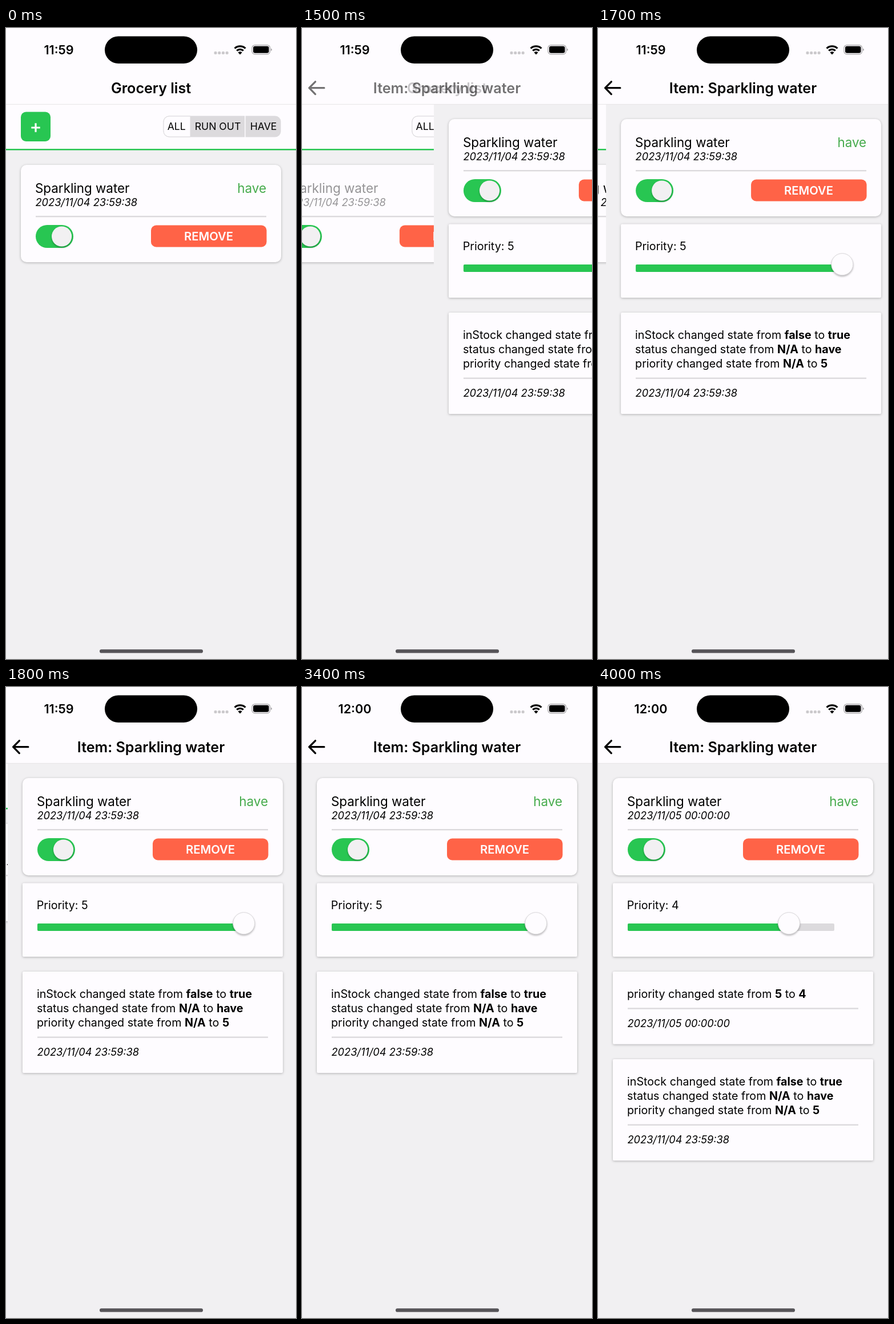
Animation, 508 px wide and 1102 px high, one loop 6400 ms. Source, as an HTML page:

```html
<!DOCTYPE html>
<html lang="en">
<head>
<meta charset="utf-8">
<title>Grocery list</title>
<style>
  html, body { margin: 0; height: 100%; overflow: hidden; background: #f1f0f2; }
  svg { display: block; width: 508px; height: 1102px; font-family: Inter, "Liberation Sans", sans-serif; }
  .title { font-size: 25.1px; font-weight: 600; text-anchor: middle; }
  .clock { font-size: 21.6px; font-weight: 600; text-anchor: middle; }
  .name { font-size: 22.4px; }
  .have { fill: #46ab4c; text-anchor: end; }
  .date { font-size: 18.2px; font-style: italic; }
  .body { font-size: 19.7px; }
  .body tspan { font-weight: 700; }
  .button { font-size: 20.3px; font-weight: 600; fill: #fefcff; text-anchor: middle; }
  .tab { font-size: 17.6px; text-anchor: middle; }
  .card { filter: drop-shadow(0 1px 2px #0004); }
  .knob { filter: drop-shadow(0 2px 1.5px #0004); }
</style>
</head>
<body>
<svg id="stage" viewBox="0 0 508 1102"></svg>
<script>
const LOOP = 6400, STEP = 100;
const WHITE = '#fefcff', GREEN = '#28c652', GREY = '#dcdadd', BACK = '#f1f0f2';
const OLD_DATE = '2023/11/04 23:59:38', NEW_DATE = '2023/11/05 00:00:00';

const clamp = v => Math.min(1, Math.max(0, v));
const smooth = (t, from, to) => {
  const u = clamp((t - from) / (to - from));
  return u * u * (3 - 2 * u);
};
// Critically damped spring from 0 to 1
const spring = (t, from, rate) => {
  const x = Math.max(0, t - from) * rate;
  return 1 - (1 + x) * Math.exp(-x);
};

const rect = (x, y, w, h, fill, r = 0, extra = '') =>
  `<rect x="${x}" y="${y}" width="${w}" height="${h}" rx="${r}" fill="${fill}" ${extra}/>`;
const text = (x, y, kind, content) => `<text x="${x}" y="${y}" class="${kind}">${content}</text>`;
const group = (x, y, content, opacity = 1) =>
  `<g transform="translate(${x} ${y})" opacity="${opacity}">${content}</g>`;
const card = (y, h, r = 2) => rect(26, y, 456, h, WHITE, r, 'class="card"');
const rule = y => rect(52, y, 404, 2.4, GREY);

function itemCard(y, date, opacity) {
  const labels = text(51, 49, 'name', 'Sparkling water') + text(456, 49, 'name have', 'have') +
    text(51.5, 71.7, 'date', date);
  return group(0, y,
    card(0, 170, 10) + group(0, 0, labels, opacity) + rule(89) +
    rect(52, 105, 66, 40, GREEN, 20) +
    '<circle class="knob" cx="97.6" cy="125" r="17.6" fill="#f2f0f2"/>' +
    rect(254, 105.5, 202.5, 38, '#ff6347', 9) + text(355, 131.8, 'button', 'REMOVE'));
}

function historyCard(y, changes, date) {
  const lines = changes.map(([field, before, after], i) => text(51, 45.6 + i * 25.1, 'body',
    `${field} changed state from <tspan>${before}</tspan> to <tspan>${after}</tspan>`));
  const end = changes.length * 25.1;
  return group(0, y, card(0, 101.7 + end) + lines.join('') + rule(38.2 + end) +
    text(51.5, 71.4 + end, 'date', date));
}

function listScreen(pressOpacity) {
  return rect(0, 133, 508, 969, BACK) + rect(0, 133, 508, 78, WHITE) +
    rect(0, 211, 508, 2.5, GREEN) + rect(26, 146.5, 52, 51.5, GREEN, 9) +
    `<path d="M44.3 174H59.7M52 166.3V181.7" stroke="${WHITE}" stroke-width="3.2"/>` +
    rect(275.5, 153.5, 206, 37, GREY, 10) +
    `<path d="M323 154H286a10 10 0 0 0-10 10v16a10 10 0 0 0 10 10h37z" fill="${WHITE}" stroke="${GREY}"/>` +
    rect(418, 153, 1.5, 38, WHITE) +
    text(298.7, 178.3, 'tab', 'ALL') + text(371, 178.3, 'tab', 'RUN OUT') +
    text(451, 178.3, 'tab', 'HAVE') + itemCard(239, OLD_DATE, pressOpacity);
}

function detailScreen(t) {
  const saved = t >= 3800;
  const knobX = 413.7 - 79.2 * smooth(t, 3345, 3750);
  const first = [['inStock', 'false', 'true'], ['status', 'N/A', 'have'], ['priority', 'N/A', '5']];
  return rect(0, 133, 508, 969, BACK) + itemCard(159, saved ? NEW_DATE : OLD_DATE, 1) +
    card(342.5, 128.5) + text(50.8, 388, 'body', `Priority: ${saved ? 4 : 5}`) +
    rect(52, 413, 362, 13, GREY, 2) + rect(52, 413, knobX - 52, 13, GREEN, 2) +
    `<circle class="knob" cx="${knobX}" cy="412.7" r="19" fill="${WHITE}" stroke="#d8d6d9"/>` +
    (saved ? historyCard(497, [['priority', '5', '4']], NEW_DATE) : '') +
    historyCard(saved ? 650 : 497, first, OLD_DATE);
}

function statusBar(t) {
  const dots = [367, 373.7, 380.4, 387.1].map(x => rect(x - 2.5, 41, 5, 5, '#cbc9cc', 1.8));
  return text(92.5, 46, 'clock', t < 3400 ? '11:59' : '12:00') +
    rect(173, 14.5, 162, 47.5, '#000', 23.75) + dots.join('') +
    '<path d="M400.6 35.6a13.6 13.6 0 0 1 18.8 0M404.2 39.7a8.4 8.4 0 0 1 11.6 0" fill="none" stroke="#000" stroke-width="3.2"/>' +
    '<path d="M410 46.4l-3.5-3.6a5 5 0 0 1 7 0z"/>' +
    rect(431, 29.8, 31.5, 16, 'none', 5, 'stroke="#a3a1a4" stroke-width="1.2"') +
    rect(433, 31.8, 27.5, 12, '#000', 3.2) +
    '<path d="M464 35.5q2 .7 2 2.3t-2 2.3z" fill="#a3a1a4"/>';
}

function header(t, push) {
  const arrow = '<path d="M23.3 93.8L12.6 104.7L23.3 115.6M12.6 104.7H38.8" fill="none" stroke="#000" stroke-width="3.3" stroke-linecap="round" stroke-linejoin="round"/>';
  return rect(0, 0, 508, 133, WHITE) + rect(0, 132.8, 508, 1, '#e6e4e7') + statusBar(t) +
    group(0, 0, text(254, 113.5, 'title', 'Grocery list'), (1 - push) ** 2) +
    group(0, 0, arrow + text(254, 113.5, 'title', 'Item: Sparkling water'), push);
}

function scene(t) {
  const push = spring(t, 1399, 0.0181);
  const pressOpacity = t < 1300 ? 1 : 0.2 + 0.8 * smooth(t, 1400, 1700);
  return group(-152.4 * push, 0, listScreen(pressOpacity)) +
    group(508 * (1 - push), 0, detailScreen(t)) +
    header(t, push) + rect(164, 1085.3, 181, 6.2, '#565458', 3.1);
}

const stage = document.getElementById('stage');
let shown = -1;
function draw() {
  const t = Math.floor(performance.now() % LOOP / STEP) * STEP;
  if (t !== shown) stage.innerHTML = scene(shown = t);
  requestAnimationFrame(draw);
}
draw();
</script>
</body>
</html>
```
